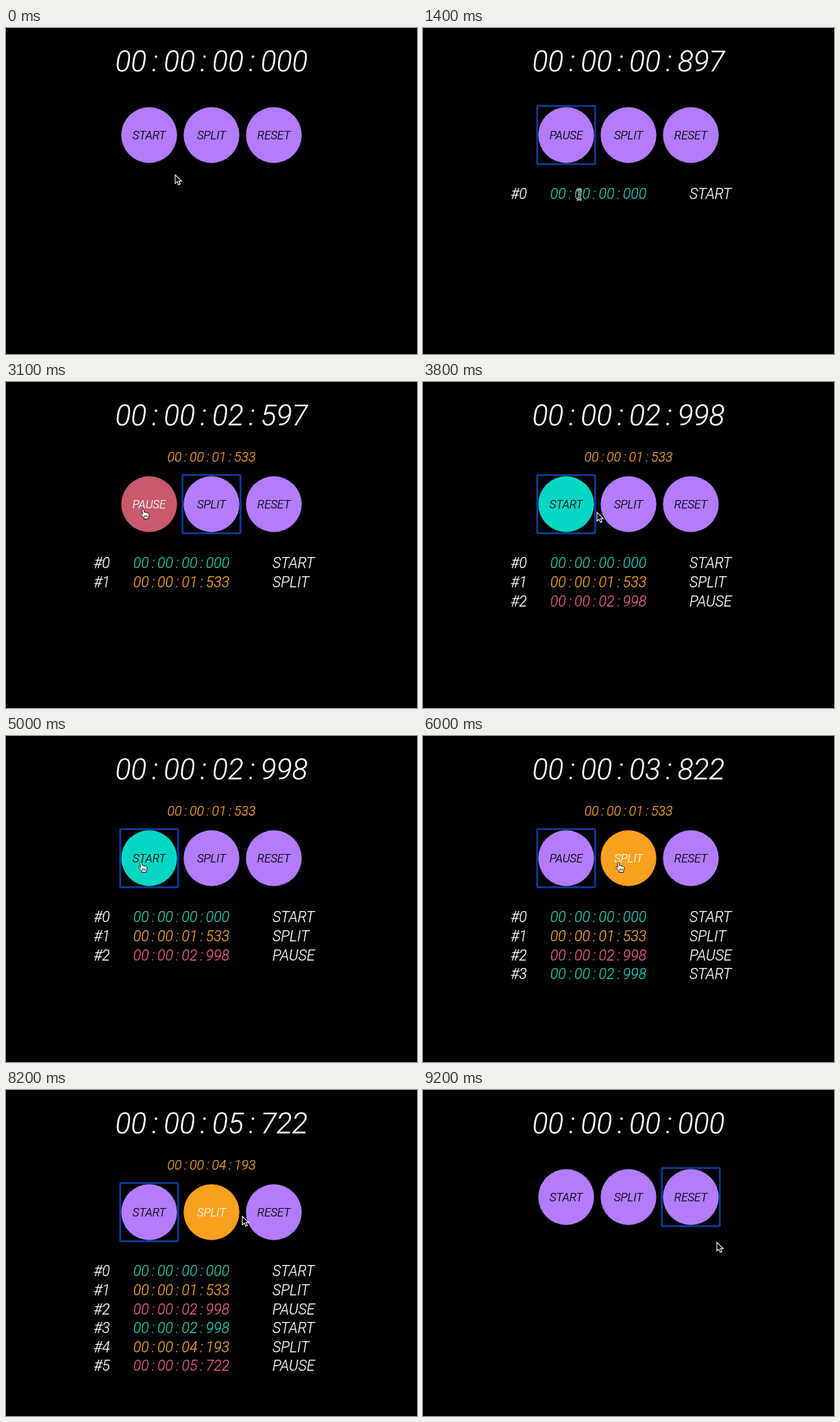
Write an HTML page that moves like this. It is 600x475 px and loops after 9.3 s.

```html
<!DOCTYPE html>
<html lang="en">
<head>
<meta charset="utf-8">
<title>Stopwatch</title>
<style>
  html, body { margin: 0; width: 100%; height: 100%; overflow: hidden; background: #000; }
  svg { display: block; width: 600px; height: 475px; }
  text {
    font: italic 300 21.33px Roboto, sans-serif; word-spacing: -.054em;
    color: #fff; fill: currentColor; stroke: currentColor; stroke-width: .25;
  }
  .mid { text-anchor: middle; }
  #clock { font-size: 42.67px; }
  #lap { font-size: 19.6px; color: #f5a02a; }
  #buttons text { font-size: 16.8px; }
  #ring { fill: none; stroke: #0a3b9a; stroke-width: 2.8; }
  #arrow { fill: #000; stroke: #fff; stroke-width: 1.1; }
  #hand { fill: #fff; stroke: #000; stroke-width: .9; stroke-linejoin: round; }
  #beam { fill: none; stroke: #fff; stroke-width: 2.8; }
  #beam + use { stroke: #000; }
</style>
</head>
<body>
<svg viewBox="0 0 600 475">
  <text id="clock" class="mid" x="300" y="63"></text>
  <text id="lap" class="mid" x="300" y="116.3"></text>
  <g id="panel">
    <rect id="ring" y="113.7" width="84.6" height="84.6" rx="1.5"/>
    <g id="buttons"></g>
    <g id="rows"></g>
  </g>
  <g id="cursor">
    <path id="arrow" d="M0 0V12.6L3 9.9 5 14.5 7.3 13.5 5.3 9.1H9.4Z"/>
    <g id="hand">
      <path d="M-1.4 1.3C-1.4-.4 1-.4 1.2 1.2L1.9 5.2C2.6 4.2 4 4.5 4.2 5.6 5 4.8 6.4 5.2 6.5 6.3 7.4 5.7 8.7 6.3 8.8 7.5 9 9.8 8.4 11.3 7.8 12.4V14.6H1.3V13C0 11.7-1.8 9.9-3 8.2-3.8 6.9-2.2 6-1.2 6.9L-.4 7.6Z"/>
      <path d="M2.2 9.2V12.2M4.2 9.2V12.2M6.2 9.2V12.2"/>
    </g>
    <g id="text-cursor">
      <path id="beam" d="M-3.5-7Q0-7 0-4.5Q0-7 3.5-7M0-4.5V4.5M-3.5 7Q0 7 0 4.5Q0 7 3.5 7M-2 2H2"/>
      <path d="M-3.5-7Q0-7 0-4.5Q0-7 3.5-7M0-4.5V4.5M-3.5 7Q0 7 0 4.5Q0 7 3.5 7M-2 2H2" fill="none" stroke="#000"/>
    </g>
  </g>
</svg>
<script>
const LOOP = 9300, STEP = 100, HOVER_HOLD = 200;
const RADIUS = 40.7, PITCH = 27.6, LAP_SHIFT = 22, MID_Y = 156;

const PURPLE = '#b27cfc', TEAL = '#04d7c3', ORANGE = '#f9a01f', RED = '#c85a6c';
const ROW_INK = { START: '#26c9b0', SPLIT: '#f5a02a', PAUSE: '#e95f84' };
const HOVER = { START: TEAL, SPLIT: ORANGE, PAUSE: RED, RESET: RED };
const SLOT = { START: 0, PAUSE: 0, SPLIT: 1, RESET: 2 };

const PRESSES = [
  [503, 'START'], [2036, 'SPLIT'], [3501, 'PAUSE'], [5176, 'START'],
  [6371, 'SPLIT'], [7900, 'PAUSE'], [8600, 'RESET']
].map(([at, name]) => ({ at, name }));

// where the pointer wanders between presses
const WANDER = [
  [0, 247, 214], [1400, 228, 243], [2400, 264, 201],
  [3800, 254, 190], [7200, 369, 179], [9200, 429, 222]
].map(([at, x, y]) => ({ at, x, y }));

const $ = id => document.getElementById(id);
const centerX = slot => 209 + 91 * slot;
const firstLap = PRESSES.find(p => p.name === 'SPLIT').at;

const stops = PRESSES.map(({ at, name }) => ({
  at, x: centerX(SLOT[name]) - 12, y: MID_Y + 6 + (at > firstLap ? LAP_SHIFT : 0)
})).concat(WANDER).sort((a, b) => a.at - b.at);

function pointer(t) {
  const i = stops.findIndex(s => s.at > t);
  if (i < 0) return stops[stops.length - 1];
  const a = stops[i - 1], b = stops[i];
  const k = 1 - (1 - (t - a.at) / (b.at - a.at)) ** 3;
  return { x: Math.round(a.x + (b.x - a.x) * k), y: Math.round(a.y + (b.y - a.y) * k) };
}

// running time since the last reset
function elapsed(t) {
  let total = 0, since = null;
  for (const { at, name } of PRESSES) {
    if (at > t) break;
    if (name === 'START') since = at;
    if (name === 'PAUSE') { total += at - since; since = null; }
    if (name === 'RESET') { total = 0; since = null; }
  }
  return total + (since === null ? 0 : t - since);
}

function format(ms) {
  const pad = (n, len = 2) => String(n).padStart(len, '0');
  const s = Math.floor(ms / 1000);
  return [pad(Math.floor(s / 3600)), pad(Math.floor(s / 60) % 60),
    pad(s % 60), pad(ms % 1000, 3)].join(' : ');
}

function add(parent, tag, attrs, content = '') {
  const el = document.createElementNS('http://www.w3.org/2000/svg', tag);
  for (const name in attrs) el.setAttribute(name, attrs[name]);
  el.textContent = content;
  return parent.appendChild(el);
}

function show(el, on) {
  el.style.display = on ? '' : 'none';
}

const buttons = [0, 1, 2].map(slot => ({
  disc: add($('buttons'), 'circle', { cx: centerX(slot), cy: MID_Y, r: RADIUS }),
  label: add($('buttons'), 'text', { class: 'mid', x: centerX(slot), y: 162 })
}));

const rows = PRESSES.slice(0, -1).map(({ at, name }, i) => {
  const g = add($('rows'), 'g', {}), y = 249.4 + i * PITCH;
  add(g, 'text', { x: 128.3, y }, '#' + i);
  add(g, 'text', { class: 'mid', x: 256, y, style: 'color:' + ROW_INK[name] }, format(elapsed(at)));
  add(g, 'text', { x: 389, y }, name);
  return g;
});

function stateAt(t) {
  const past = PRESSES.filter(p => p.at <= t);
  const last = past.length ? past[past.length - 1].name : '';
  const log = last === 'RESET' ? [] : past;
  const lap = log.filter(p => p.name === 'SPLIT').pop();
  const shift = lap ? LAP_SHIFT : 0;
  const { x, y } = pointer(t);
  const over = [0, 1, 2].find(s => Math.hypot(x - centerX(s), y - MID_Y - shift) < RADIUS);
  return { last, log, lap, shift, x, y, over };
}

function draw(t) {
  const { last, log, lap, shift, x, y, over } = stateAt(t);
  const running = last === 'START' || last === 'SPLIT';
  const lit = [over, stateAt(Math.max(0, t - HOVER_HOLD)).over];

  $('clock').textContent = format(elapsed(t));
  $('lap').textContent = lap ? format(elapsed(lap.at)) : '';
  $('panel').setAttribute('transform', `translate(0 ${shift})`);

  show($('ring'), last);
  if (last) $('ring').setAttribute('x', centerX(SLOT[last]) - 42.3);

  [running ? 'PAUSE' : 'START', 'SPLIT', 'RESET'].forEach((name, slot) => {
    const { disc, label } = buttons[slot], hot = lit.includes(slot);
    disc.style.fill = hot ? HOVER[name] : PURPLE;
    label.style.color = hot && name !== 'START' ? '#fff' : '#000';
    label.textContent = name;
  });
  rows.forEach((row, i) => show(row, i < log.length));

  const top = 230 + shift;
  const onText = x > 186 && x < 326 && y > top && y < top + log.length * PITCH;
  const kind = over !== undefined ? 'hand' : onText ? 'text-cursor' : 'arrow';
  for (const id of ['arrow', 'hand', 'text-cursor']) show($(id), id === kind);
  $('cursor').setAttribute('transform', `translate(${x} ${y})`);
}

const began = performance.now();
function frame() {
  const t = (performance.now() - began) % LOOP;
  draw(Math.floor(t / STEP) * STEP);
  requestAnimationFrame(frame);
}
frame();
</script>
</body>
</html>
```
